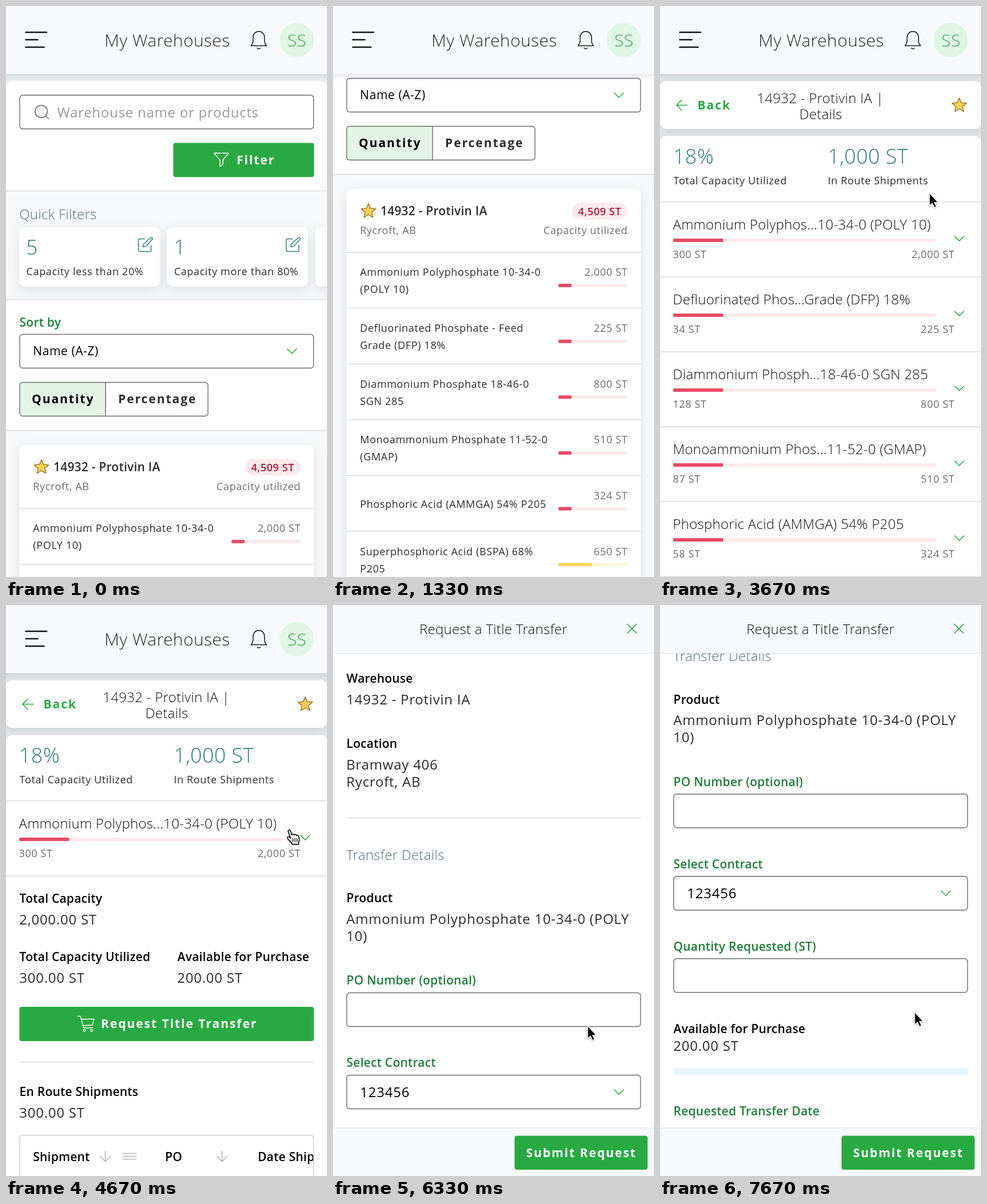
Recreate the animation shown at these times as an HTML page. Size 561 by 999 pixels, loop 8000 ms.

```html
<!DOCTYPE html>
<html lang="en">
<head>
<meta charset="utf-8">
<title>My Warehouses</title>
<style>
html, body { margin: 0; width: 100%; height: 100%; overflow: hidden; background: #fff; }
svg { display: block; width: 561px; height: 999px; font-family: "Open Sans", "Noto Sans", sans-serif; }
text { white-space: pre; }
.top { filter: drop-shadow(0 3px 6px rgba(0, 0, 0, .13)); }
.card { filter: drop-shadow(0 7px 10px rgba(30, 40, 50, .11)); }
.cursor { filter: drop-shadow(0 1px 1.5px rgba(0, 0, 0, .35)); }
.line { fill: none; stroke-linecap: round; stroke-linejoin: round; }
</style>
</head>
<body>
<svg id="stage" viewBox="0 0 561 999" xmlns="http://www.w3.org/2000/svg"></svg>
<script>
const GREEN = '#28aa42', LABEL = '#1f7c39', TEAL = '#2f7f7c', SLATE = '#526c7c',
      INK = '#2b2b2b', GREY = '#6b6b6b', RED = '#e84a66', PINK = '#fde9ec',
      YELLOW = '#fcd75e', CREAM = '#fff5da', RULE = '#d9dbdd', BAR = '#f8f9fc', MINT = '#e3f4e6';

// size, weight, letter spacing
const FONTS = {
  small: [17.95, 400, .67], badge: [17.95, 600, .67], field: [20.94, 400, .6],
  label: [20.94, 600, .25], button: [20.94, 700, 2], light: [23.94, 300, .3],
  value: [23.94, 400, .78], title: [29.92, 300, .45], big: [35.9, 300, .35]
};

// cy is the middle of the capital letters
function text(font, x, cy, str, fill = INK, anchor = 'start') {
  const [size, weight, gap] = FONTS[font];
  return `<text x="${x}" y="${(cy + size * .357).toFixed(2)}" font-size="${size}" font-weight="${weight}"
    letter-spacing="${gap}" fill="${fill}" text-anchor="${anchor}">${str}</text>`;
}
const rect = (x, y, w, h, fill, r = 0, more = '') =>
  `<rect x="${x}" y="${y}" width="${w}" height="${h}" rx="${r}" fill="${fill}" ${more}/>`;
const path = (d, stroke, width = 1.5) =>
  `<path class="line" d="${d}" stroke="${stroke}" stroke-width="${width}"/>`;
const rule = (y, x = 0, w = 561) => rect(x, y - .75, w, 1.5, RULE);
const at = (x, y, inner) => `<g transform="translate(${x} ${y})">${inner}</g>`;
const OUTLINE = 'stroke="#6c6c6c" stroke-width="1.4"';
const box = y => rect(24, y, 513.5, 59, '#fff', 5, OUTLINE);
const chevron = (x, y) => path(`M${x - 8} ${y - 4}l8 8 8-8`, GREEN, 1.6);
const range = n => [...Array(n).keys()];

function star(x, y) {
  const pts = range(10).map(i => {
    const r = i % 2 ? 6 : 13.2, a = i * Math.PI / 5;
    return `${(x + r * Math.sin(a)).toFixed(1)} ${(y + 1 - r * Math.cos(a)).toFixed(1)}`;
  });
  return `<path d="M${pts.join('L')}Z" fill="#ffd14f" stroke="#8b6420" stroke-width="1.3" stroke-linejoin="round"/>`;
}

const meter = (x, y, w, used, yellow) =>
  rect(x, y - 3, w, 6, yellow ? CREAM : PINK, 2.5) + rect(x, y - 3, used, 6, yellow ? YELLOW : RED, 2);

const pencil = (x, y) => at(x, y,
  path('M12 3H3q-2 0-2 2v18q0 2 2 2h18q2 0 2-2V14M9 17l1-5L22 1q2-1 3 0 1 1 0 3L14 16z', TEAL));

const products = [
  ['Ammonium Polyphosphate 10-34-0', '(POLY 10)', '2,000 ST', '15%'],
  ['Defluorinated Phosphate - Feed', 'Grade (DFP) 18%', '225 ST', '15%'],
  ['Diammonium Phosphate 18-46-0', 'SGN 285', '800 ST', '16%'],
  ['Monoammonium Phosphate 11-52-0', '(GMAP)', '510 ST', '17%'],
  ['Phosphoric Acid (AMMGA) 54% P205', '', '324 ST', '18%'],
  ['Superphosphoric Acid (BSPA) 68%', 'P205', '650 ST', '26%']
];

function appBar() {
  return `<g class="top">${rect(-20, -20, 601, 139, BAR)}</g>` +
    path('M34.5 46H71M34.5 59H55.5M34.5 72H66.5', '#161616', 2.6) +
    text('title', 172, 60.5, 'My Warehouses', '#2a2a2a') +
    path('M428 69.5h27.5c-3-2.5-3.7-5-3.7-9.5v-5c0-6-4-10.5-10-10.5s-10 4.5-10 10.5v5c0 4.5-.8 7-3.8 9.5zM439 73.5q2.8 2.8 5.6 0', '#161616') +
    '<circle cx="508" cy="59.5" r="30" fill="#dff6e4"/>' +
    text('title', 508.5, 60, 'SS', '#43a45b', 'middle');
}

function quickCard(x, count, label) {
  return `<g class="card">${rect(x, 387, 246.5, 103.5, '#fff', 10)}</g>` +
    text('big', x + 12, 422, count, TEAL) + pencil(x + 207.5, 404.5) +
    text('small', x + 12.5, 465, label);
}

function listRow([name, rest, amount, share], i, percent) {
  const y = 879 + 97.65 * i, yellow = i === 5;
  return rule(y, 23.5, 514.5) +
    (rest ? text('small', 47.3, y + 35, name) + text('small', 47.3, y + 65, rest)
          : text('small', 47.3, y + 49.5, name)) +
    text('small', 515, y + 35, percent ? share : amount, GREY, 'end') +
    meter(394, y + 58, 120, yellow ? 59 : 23, yellow);
}

function toggle(percent) {
  const half = percent ? 'M174 658.5H348q5 0 5 5V712.5q0 5-5 5H174z' : 'M174 658.5H29q-5 0-5 5V712.5q0 5 5 5H174z';
  return `<path d="${half}" fill="${MINT}"/>` +
    rect(24, 658.5, 329, 59, 'none', 5, OUTLINE) + path('M174 659V717', '#6c6c6c', 1.4) +
    text('button', 45, 688, 'Quantity', percent ? INK : '#000') +
    text('button', 196, 688, 'Percentage', percent ? '#000' : INK);
}

function list(percent) {
  return rect(0, 131.5, 561, 220, '#fff', 11) + rect(0, 323, 561, 190, '#f6f8fa') +
    box(156) +
    '<circle cx="61.5" cy="184.5" r="10.8" fill="none" stroke="#6c6c6c" stroke-width="1.5"/>' +
    path('M69.5 192.5l5 5', '#6c6c6c') +
    text('value', 89.5, 186, 'Warehouse name or products', '#989898') +
    rect(292.3, 239.5, 246, 59.8, GREEN, 4) +
    path('M363.5 257.5h25.5l-10 12v8l-5 3.5v-11.5z', '#fff') +
    text('button', 403, 269.5, 'Filter', '#fff') +
    rule(323.5) + text('light', 23.2, 364.5, 'Quick Filters', SLATE) +
    quickCard(23, '5', 'Capacity less than 20%') +
    quickCard(281.2, '1', 'Capacity more than 80%') +
    `<g class="card">${rect(540, 387, 60, 103.5, '#fff', 10)}</g>` +
    rect(0, 513, 561, 229, '#fff') + rule(513.5) +
    text('label', 23.6, 553.5, 'Sort by', LABEL) +
    box(574.5) + text('field', 47.3, 604, 'Name (A-Z)', '#000') + chevron(499.5, 604) +
    toggle(percent) + rect(0, 742, 561, 900, '#f6f8fa') + rule(742.5) +
    `<g class="card">${rect(23.5, 768, 514.5, 780, '#fff', 10)}</g>` +
    star(62, 806) + text('label', 83, 807, '14932 - Protivin IA') +
    text('small', 47.3, 841, 'Rycroft, AB', GREY) +
    (percent ? rect(457, 792.5, 57, 29, PINK, 14.5) + text('badge', 486, 807.5, '18%', '#b0183a', 'middle')
             : rect(418, 792.5, 96, 29, PINK, 14.5) + text('badge', 466.3, 807.5, '4,509 ST', '#b0183a', 'middle')) +
    text('small', 515, 841, 'Capacity utilized', GREY, 'end') +
    products.map((p, i) => listRow(p, i, percent)).join('') +
    rule(1464.9, 23.5, 514.5) + text('small', 47.3, 1499.5, 'Last updated today, 1:00', GREY);
}

const stock = [
  ['Ammonium Polyphos...10-34-0 (POLY 10)', '300 ST', '2,000 ST'],
  ['Defluorinated Phos...Grade (DFP) 18%', '34 ST', '225 ST'],
  ['Diammonium Phosph...18-46-0 SGN 285', '128 ST', '800 ST'],
  ['Monoammonium Phos...11-52-0 (GMAP)', '87 ST', '510 ST'],
  ['Phosphoric Acid (AMMGA) 54% P205', '58 ST', '324 ST']
];

function stockRow([name, used, total], i) {
  const y = 343 + 131 * i;
  return text('light', 22.5, y + 39.5, name, '#111') + meter(23, y + 67, 460, 87.5) +
    text('small', 22.5, y + 92, used, GREY) + text('small', 515, y + 92, total, GREY, 'end') +
    chevron(523, y + 64) + rule(y + 131);
}

const fact = (x, y, label, value, gap = 36.5) =>
  text('label', x + .6, y, label, '#000') + text('value', x + .3, y + gap, value);

function breakdown() {
  return fact(23, 514, 'Total Capacity', '2,000.00 ST') +
    fact(23, 616, 'Total Capacity Utilized', '300.00 ST') +
    fact(299, 616, 'Available for Purchase', '200.00 ST') +
    rect(23.5, 703, 514.5, 60, GREEN, 4) +
    path('M125.5 719.5h4.5l6 20.5h15.5M131.5 724.5h22.5l-3 10.5-16.5 1', '#fff', 1.3) +
    '<g fill="none" stroke="#fff" stroke-width="1.3"><circle cx="137" cy="744.5" r="1.8"/><circle cx="149.500" cy="744.5" r="1.8"/></g>' +
    text('button', 166, 733, 'Request Title Transfer', '#fff') +
    rule(799.5, 23.5, 514.5) + fact(23, 852, 'En Route Shipments', '300.00 ST') +
    text('label', 47.3, 966, 'Shipment', '#000') + text('label', 278, 966, 'PO', '#000') +
    text('label', 440, 966, 'Date Ship', '#000') +
    [173.5, 377.5].map(x => path(`M${x} 956v17M${x - 9} 964.5l9 9 9-9`, '#a9a9a9', 1.4)).join('') +
    path('M204 959.5h23.5M204 964.5h23.5M204 969.5h23.5', '#b4b4b4', 1.3) +
    rect(537.5, 930, 24, 70, '#fff') +
    rect(24, 927.5, 513.5, 100, 'none', 5, 'stroke="#c9c9c9" stroke-width="1.4"');
}

function detail(open) {
  return rect(0, 119, 561, 880, '#e6e9eb') +
    `<g class="card">${rect(0, 131.5, 561, 83.5, '#fff', 11)}</g>` +
    path('M47.5 173.5H29.5M38 164.5l-9 9 9 9', GREEN, 1.6) +
    text('button', 65.5, 173.5, 'Back', GREEN) +
    text('light', 280, 161, '14932 - Protivin IA |', '#111', 'middle') +
    text('light', 281, 189, 'Details', '#111', 'middle') + star(523, 173) +
    rect(0, 227.5, 561, 800, '#fff', 11) +
    text('big', 23, 263, '18%', TEAL) + text('small', 23.6, 305.5, 'Total Capacity Utilized') +
    text('big', 293.2, 263, '1,000 ST', TEAL) + text('small', 293.3, 305.5, 'In Route Shipments') +
    rule(342.5) + stock.slice(0, open ? 1 : 5).map(stockRow).join('') + (open ? breakdown() : '');
}

function form() {
  const entry = (y, label) => text('label', 23.6, y, label, LABEL) + box(y + 21.5);
  return text('light', 23.2, 125, 'Customer Details', SLATE) +
    fact(23, 201, 'Customer', 'Quillow Farm Inc.') +
    fact(23, 315, 'Account Number', '123456789') +
    fact(23, 429, 'Warehouse', '14932 - Protivin IA') +
    fact(23, 543, 'Location', 'Bramway 406') + text('value', 23.3, 609.5, 'Rycroft, AB') +
    rule(672.5, 23.5, 514.5) + text('light', 23.2, 737, 'Transfer Details', SLATE) +
    fact(23, 813, 'Product', 'Ammonium Polyphosphate 10-34-0 (POLY') + text('value', 23.3, 879.5, '10)') +
    entry(957, 'PO Number (optional)') +
    entry(1101, 'Select Contract') + text('value', 47.3, 1152.5, '123456', '#000') + chevron(499.5, 1152) +
    entry(1245, 'Quantity Requested (ST)') +
    fact(23, 1389, 'Available for Purchase', '200.00 ST', 30.5) +
    rect(23.5, 1458, 514.5, 12, '#e7f5fe', 4) +
    text('label', 23.6, 1533, 'Requested Transfer Date', LABEL);
}

function formBars() {
  return rect(0, 0, 561, 84, BAR) + rect(0, 83.7, 561, 1.3, '#e4e6e9') +
    text('light', 280.5, 42.5, 'Request a Title Transfer', '#111', 'middle') +
    path('M514.5 33.5l16 16M530.5 33.5l-16 16', GREEN, 1.6) +
    rect(0, 915, 561, 84, BAR) + rect(0, 914.5, 561, 1.3, '#e8eaed') +
    rect(317.3, 928.5, 232.5, 59.5, GREEN, 4) + text('button', 337.5, 958.5, 'Submit Request', '#fff');
}

const group = (id, inner, hidden = true) => `<g id="${id}" ${hidden ? 'display="none"' : ''}>${inner}</g>`;
const stage = document.getElementById('stage');
stage.innerHTML = rect(0, 0, 561, 999, '#eceff1') +
  group('quantity', list(false)) + group('percent', list(true)) +
  group('closed', detail(false)) + group('open', detail(true)) +
  group('appBar', appBar(), false) +
  group('modal', rect(0, 0, 561, 999, '#fff') + group('form', form(), false) + formBars()) +
  '<g class="cursor">' +
  group('arrow', '<path d="M0-1V21.5L5 17 8.5 24.5 12 23 8.7 15.7H15.2Z" fill="#000" stroke="#fff" stroke-width="1.3"/>') +
  group('hand', at(-1.5, 0,
    '<path d="M-3 3q-1-3 1.5-3.4 1.8 0 2.6 2.6l1.6 6.4q.3-2 2.3-1.8 1.8.2 2 1.8.6-1.4 2.4-1 1.6.4 1.8 1.8.8-1 2.2-.4 1.6.8 2 3.4 1 5-.4 8.2l-.2 4h-11q-1.5-3.5-5-6.5-3-3-3.6-5 .4-2.4 3-1.2l2.6 2.2z" fill="#fff" stroke="#000" stroke-width="1.5" stroke-linejoin="round"/>' +
    path('M5 14.5v5.5M8.5 14.5v5.5M12 14.5v5.5', '#000', 1.3))) + '</g>';

// time, screen, scroll, cursor, x, y
const steps = [
  [0, 'quantity', 0],
  [670, 'quantity', 130],
  [1000, 'quantity', 340],
  [1330, 'quantity', 448],
  [2000, 'quantity', 496],
  [2330, 'quantity', 496, 'hand', 272, 160],
  [2670, 'percent', 496, 'arrow', 270, 174],
  [3000, 'percent', 496, 'hand', 512, 281],
  [3330, 'percent', 496, 'hand', 471, 328],
  [3670, 'closed', 0, 'arrow', 471, 328],
  [4000, 'closed', 0, 'arrow', 490, 370],
  [4330, 'closed', 0, 'hand', 498, 394],
  [4670, 'open', 0, 'hand', 498, 394],
  [5000, 'open', 0, 'hand', 470, 708],
  [5330, 'open', 0, 'hand', 445, 736],
  [5670, 'modal', 0, 'arrow', 445, 737],
  [6330, 'modal', 300, 'arrow', 445, 737],
  [6670, 'modal', 480, 'arrow', 445, 737],
  [7000, 'modal', 533.7, 'hand', 445, 737],
  [7330, 'modal', 600, 'arrow', 445, 728],
  [7670, 'modal', 647.8, 'arrow', 445, 713]
];
const LOOP = 8000;
const el = id => document.getElementById(id);
const show = (id, on) => el(id).setAttribute('display', on ? 'inline' : 'none');
const move = (id, x, y) => el(id).setAttribute('transform', `translate(${x} ${y})`);
let current;

function draw(step) {
  const [, screen, scroll, cursor, x, y] = step;
  ['quantity', 'percent', 'closed', 'open', 'modal'].forEach(id => show(id, id === screen));
  ['arrow', 'hand'].forEach(id => show(id, id === cursor));
  move(screen === 'modal' ? 'form' : screen, 0, -scroll);
  if (cursor) move(cursor, x, y);
}

function tick() {
  const t = performance.now() % LOOP;
  const step = steps.findLast(s => s[0] <= t);
  if (step !== current) draw(current = step);
  requestAnimationFrame(tick);
}
tick();
</script>
</body>
</html>
```
